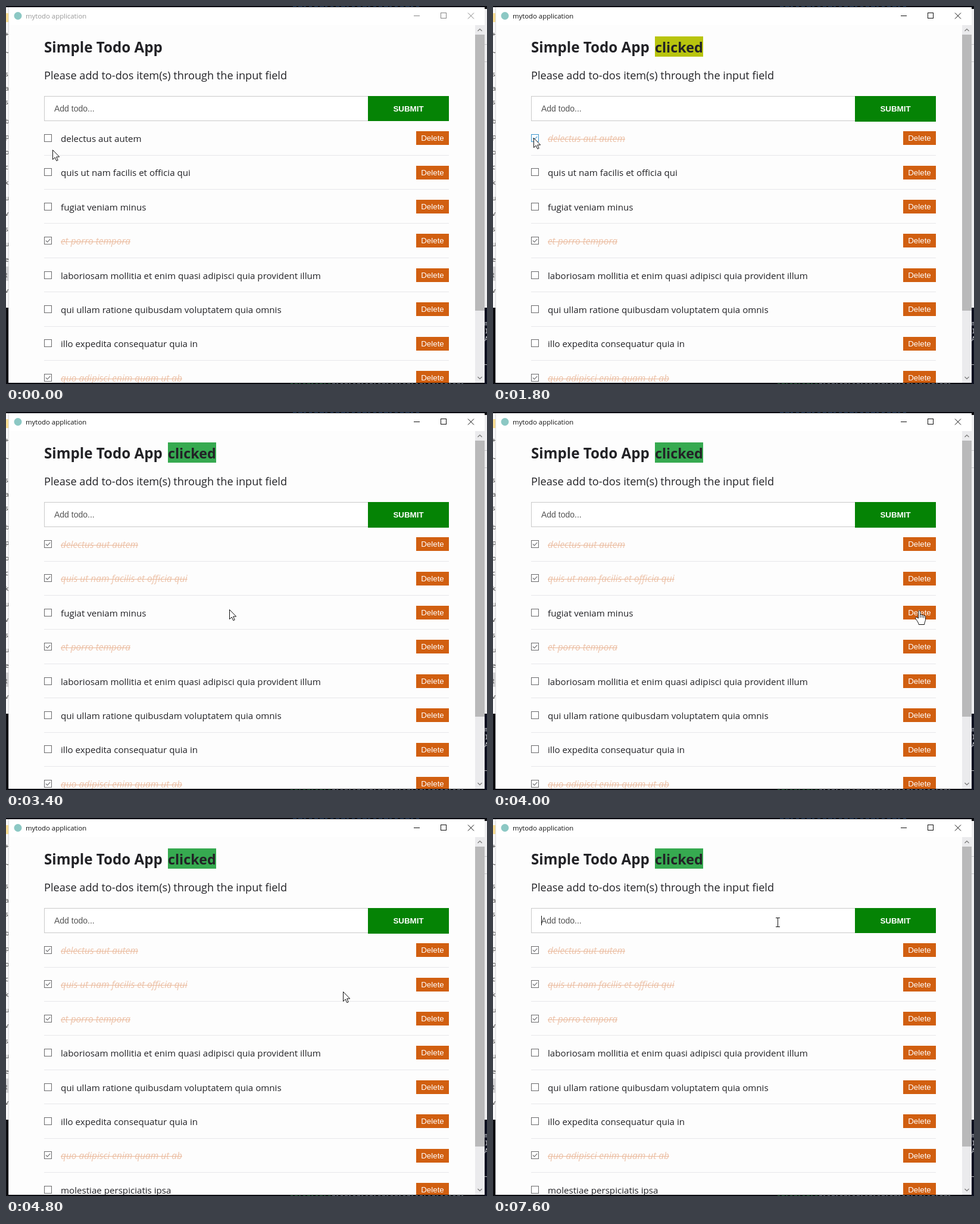
An HTML page with a canvas for the animation above (8 s loop, 808x634 px).

```html
<!DOCTYPE html>
<html lang="en">
<head>
<meta charset="utf-8">
<title>mytodo application</title>
<style>
html, body { margin: 0; width: 100%; height: 100%; overflow: hidden; background: #fdfdfd; }
canvas { display: block; width: 808px; height: 634px; }
</style>
</head>
<body>
<canvas id="stage" width="808" height="634"></canvas>
<script>
const ctx = document.getElementById('stage').getContext('2d');
const LOOP = 8000, STEP = 200, PITCH = 57.4;
const SANS = '"Open Sans", "Noto Sans", sans-serif';
const UI = '"Liberation Sans", Arial, sans-serif';
const INK = '#222226', FADED = '#edc3aa';

const todos = [
  ['delectus aut autem', 1400],
  ['quis ut nam facilis et officia qui', 3000],
  ['fugiat veniam minus', Infinity],
  ['et porro tempora', 0],
  ['laboriosam mollitia et enim quasi adipisci quia provident illum', Infinity],
  ['qui ullam ratione quibusdam voluptatem quia omnis', Infinity],
  ['illo expedita consequatur quia in', Infinity],
  ['quo adipisci enim quam ut ab', 0],
  ['molestiae perspiciatis ipsa', Infinity]
].map(([text, doneAt]) => ({ text, doneAt }));

const FOCUS_AT = 1200, DELETE_AT = 4200, CARET_AT = 7600;

// Pointer path: time, x, y
const path = [
  [0, 78, 241], [200, 78, 241], [1000, 68, 221], [1800, 68, 221],
  [2000, 68, 225], [2600, 65, 280], [3000, 65, 280], [3200, 150, 300],
  [3600, 600, 362], [3800, 722, 338], [4000, 716, 333], [4200, 716, 333],
  [4800, 566, 291], [6400, 566, 291], [6600, 585, 283], [6800, 625, 258],
  [7000, 655, 222], [7200, 640, 190], [7400, 575, 177], [7600, 478, 175],
  [8000, 478, 175]
];

function pointerAt(t) {
  let i = 1;
  while (i < path.length - 1 && path[i][0] < t) i++;
  const [t0, x0, y0] = path[i - 1], [t1, x1, y1] = path[i];
  const k = Math.min(1, (t - t0) / (t1 - t0));
  return { x: Math.round(x0 + (x1 - x0) * k), y: Math.round(y0 + (y1 - y0) * k) };
}

function box(x, y, w, h, color) {
  ctx.fillStyle = color;
  ctx.fillRect(x, y, w, h);
}

function frame(x, y, w, h, color) {
  ctx.strokeStyle = color;
  ctx.lineWidth = 1;
  ctx.strokeRect(x + .5, y + .5, w - 1, h - 1);
}

function text(str, x, y, font, color, align = 'left') {
  ctx.font = font;
  ctx.fillStyle = color;
  ctx.textAlign = align;
  ctx.fillText(str, x, y);
}

function line(points, color, width = 1) {
  ctx.beginPath();
  points.forEach(([x, y]) => ctx.lineTo(x, y));
  ctx.strokeStyle = color;
  ctx.lineWidth = width;
  ctx.stroke();
}

function inside(p, x, y, w, h) {
  return p.x >= x && p.x < x + w && p.y >= y && p.y < y + h;
}

// Slivers of the desktop that show around the window
function drawDesktop() {
  box(0, 0, 808, 634, '#0b0c12');
  box(0, 2, 4, 504, '#f7f7f8');
  box(0, 12, 4, 15, '#f7dc92');
  box(0, 437, 4, 24, '#d2d2d4');
  ctx.save();
  ctx.beginPath();
  ctx.rect(0, 40, 4, 466);
  ctx.clip();
  [...'+~sasbpockuvsuetv'].forEach((ch, i) => {
    const y = i < 2 ? 51 + i * 31 : i < 5 ? 118 + (i - 2) * 23.5 : 197 + (i - 5) * 25.8;
    text(ch, -1.5, y, '11px ' + SANS, '#333');
  });
  ctx.restore();
  box(804, 5, 4, 501, '#eeeef0');
  box(804, 64, 4, 1, '#c4c4c8');
  box(804, 93, 4, 1, '#c4c4c8');
  box(804, 506, 4, 128, '#0c1020');
  ['m', '1', 'A'].forEach((ch, i) =>
    text(ch, 804, 536 + i * 13, '10px "DejaVu Sans Mono", monospace', '#c8c8cc'));
  box(804, 601, 4, 1, '#b8b8bc');
  for (let x = 482; x < 690; x += 9) box(x, 0, 4 + x % 4, 1, '#2c4a72');
  for (let x = 478; x < 770; x += 7) box(x, 633, 3 + x % 3, 1, x < 545 ? '#2f6b42' : '#77808c');
}

function drawWindow(active) {
  box(4, 2, 800, 630, '#fdfdfd');
  box(4, 2, 800, 30, '#ffffff');
  box(4, 2, 1, 630, '#d9d9db');
  ctx.fillStyle = '#8cc8c4';
  ctx.beginPath();
  ctx.arc(20, 16.5, 6.5, 0, Math.PI * 2);
  ctx.fill();
  const color = active ? '#111' : '#858585';
  text('mytodo application', 33, 21, '11.35px ' + SANS, active ? '#111' : '#999');
  line([[685, 16.5], [695, 16.5]], color);
  frame(730, 11, 10, 10, color);
  line([[776, 11.5], [786, 21.5]], color);
  line([[786, 11.5], [776, 21.5]], color);
}

function drawScrollbar(bottom) {
  box(788, 32, 16, 600, '#ebebed');
  box(788, 48, 16, bottom - 48, '#b9b9ba');
  line([[792.5, 42], [796, 38.5], [799.5, 42]], '#777', 1.2);
  line([[792.5, 622], [796, 625.5], [799.5, 622]], '#777', 1.2);
}

function drawHeader(t) {
  text('Simple Todo App', 64, 78, 'bold 24.2px ' + SANS, INK);
  if (t >= 1400) {
    box(272, 51, 81, 34, t < 3000 ? '#b8c40e' : '#36aa50');
    text('clicked', 272, 78, 'bold 23.3px ' + SANS, INK);
  }
  text('Please add to-dos item(s) through the input field', 64, 123, '18.16px ' + SANS, INK);
  box(64, 151, 545, 42, '#fff');
  frame(64, 151, 545, 42, '#cacaca');
  text('Add todo...', 81, 177, '14px ' + UI, '#555');
  if (t >= CARET_AT) box(81, 164, 1, 16, '#111');
  box(608, 151, 136, t >= 1400 && t < 6600 ? 43 : 42, '#058305');
  text('SUBMIT', 676, 177, 'bold 13.33px ' + UI, '#fff', 'center');
}

function drawCheckbox(y, done, hover, pressed) {
  if (pressed) return box(64, y, 13, 13, '#1d1d2b');
  const color = hover ? '#3d97cf' : '#6a6a6c';
  box(64, y, 13, 13, '#fff');
  frame(64, y, 13, 13, color);
  if (done) line([[66.8, y + 6.3], [69.5, y + 9], [74.3, y + 3.8]], color, 1.1);
}

function drawRow(todo, i, t, p) {
  const at = base => Math.floor(base + PITCH * i);
  const done = t >= todo.doneAt, top = at(215.4), base = at(228.4);
  const hover = inside(p, 64, top, 13, 13);
  const pressed = hover && !done && t >= todo.doneAt - STEP;
  drawCheckbox(top, done, hover, pressed);
  if (done) {
    text(todo.text, 92, base, 'italic 15.45px ' + SANS, FADED);
    box(92, base - 5, ctx.measureText(todo.text).width, 1, '#e9b798');
  } else {
    text(todo.text, 92, base, '15.13px ' + SANS, INK);
  }
  box(689, at(210.7), 55, 23, '#d15f10');
  text('Delete', 716.5, at(226.7), '13.33px ' + UI, '#fff', 'center');
  box(64, at(250), 680, 1, '#e7e7ea');
}

const arrow = new Path2D('M.5 .5V16.5L4.2 13L6.8 18.7L9.2 17.6L6.7 12H11.7Z');
const hand = new Path2D('M-1.5 13V1.8C-1.5 -.2 1.6 -.2 1.6 1.8V7.2C2.4 5.9 4.6 6.2 4.8 7.8' +
  'C5.8 6.8 7.6 7.2 7.8 8.8C9 8 10.5 8.8 10.5 10.4V15.5C10.5 18 8.8 19 8.6 23.5H-.8' +
  'C-1 20.5 -3.6 17.5 -6 13.8C-7.2 11.6 -4.6 10.4 -3 12Z');

function drawPointer(p) {
  const overDelete = p.x >= 689 && p.x < 744 && p.y >= 210 && (p.y - 210.7) % PITCH < 23;
  if (inside(p, 65, 152, 543, 41)) {
    line([[p.x + .5, p.y - 7], [p.x + .5, p.y + 7]], '#111');
    line([[p.x - 3, p.y - 7.5], [p.x + 4, p.y - 7.5]], '#111');
    line([[p.x - 3, p.y + 7.5], [p.x + 4, p.y + 7.5]], '#111');
    return;
  }
  ctx.save();
  ctx.translate(p.x, p.y);
  ctx.lineWidth = 1;
  ctx.lineJoin = 'round';
  ctx.fillStyle = '#fff';
  ctx.strokeStyle = '#111';
  const shape = overDelete ? hand : arrow;
  ctx.fill(shape);
  ctx.stroke(shape);
  if (overDelete) {
    line([[1.6, 7], [1.6, 12]], '#111');
    line([[4.8, 8], [4.8, 12]], '#111');
    line([[7.8, 9], [7.8, 12.5]], '#111');
  }
  ctx.restore();
}

function draw(now) {
  const t = Math.floor((now % LOOP) / STEP) * STEP;
  const p = pointerAt(t);
  const removed = t >= DELETE_AT;
  const list = removed ? todos.filter((_, i) => i !== 2) : todos;
  drawDesktop();
  drawWindow(t >= FOCUS_AT);
  ctx.save();
  ctx.beginPath();
  ctx.rect(4, 32, 800, 600);
  ctx.clip();
  drawHeader(t);
  list.slice(0, 8).forEach((todo, i) => drawRow(todo, i, t, p));
  drawScrollbar(removed ? 551 : 511);
  ctx.restore();
  drawPointer(p);
}

const start = performance.now();
function tick() {
  draw(performance.now() - start);
  requestAnimationFrame(tick);
}
tick();
</script>
</body>
</html>
```
